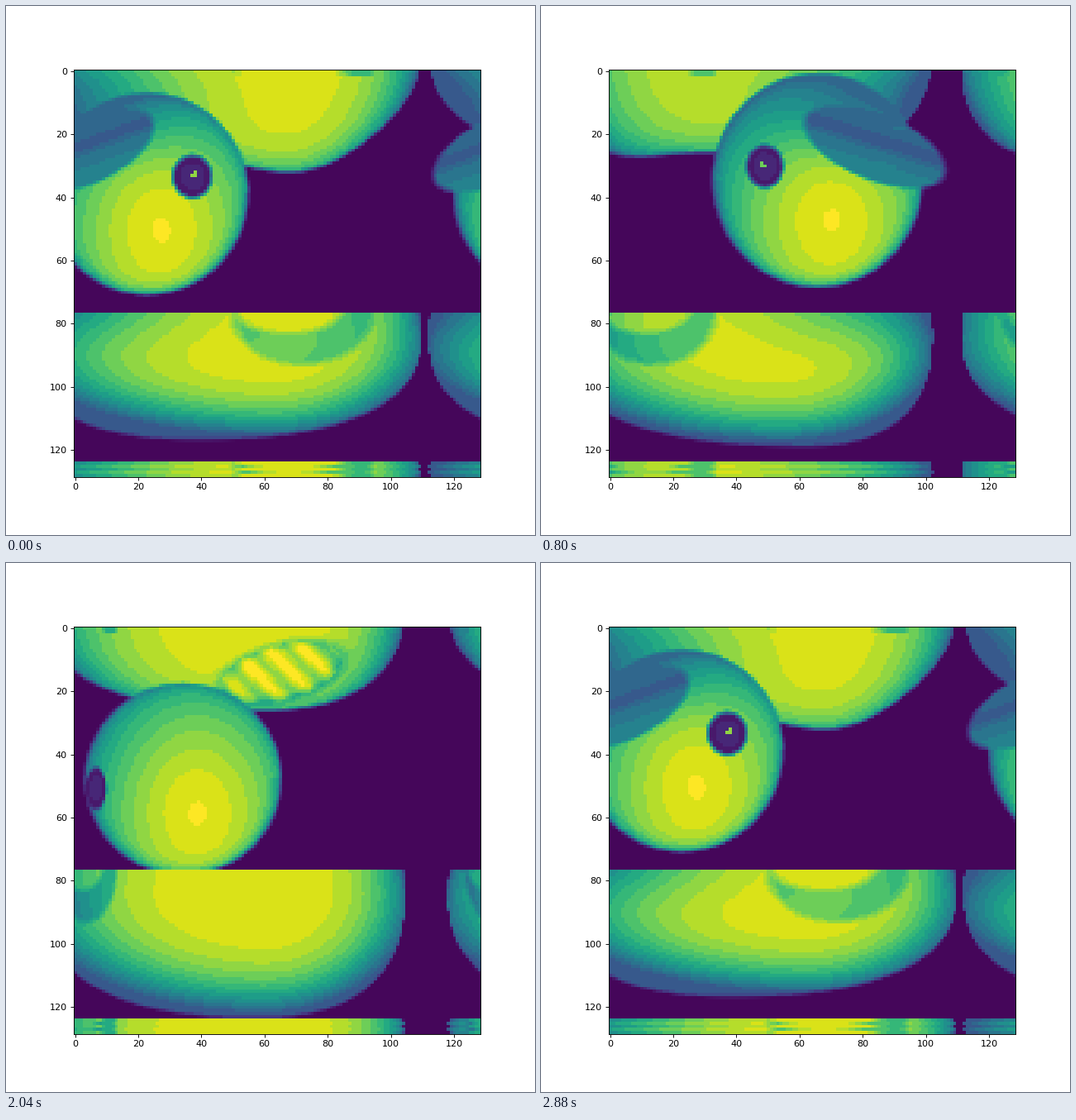
Write a matplotlib script that moves like this. It is 640 px wide and 640 px high and loops after 2.92 s.

```python
import numpy as np
import matplotlib.pyplot as plt
from matplotlib.animation import FuncAnimation

SIZE, STEPS, INTERVAL = 129, 73, 40
WAIST = 84

# The picture is rolled sideways, its upper part is flipped,
# and a few waist rows repeat at the bottom.
cols = np.arange(SIZE)
cols = np.where(cols < 110, cols, cols - SIZE)
rows = np.r_[76 - np.arange(77), np.arange(77, 124), [76, 81, 76, 82, 77]]
X, Y = np.meshgrid(cols.astype(float), rows.astype(float))
H = 76 - Y  # height above the fold


def ellipse(cx, ch, rx, ry, slope=0):
    return ((X - cx) / rx) ** 2 + ((H - ch - slope * (X - cx)) / ry) ** 2


def soft(e, radius):
    """Coverage of an ellipse with a blurred edge."""
    return np.clip((1 - e) * radius / 2.6 + 0.5, 0, 1)


def ramp(d):
    return np.clip(d / 1.5 + 0.5, 0, 1)


def over(img, value, alpha):
    return img * (1 - alpha) + value * alpha


def draw_wings(turn):
    """Darkness of the crescent under each visible wing."""
    dark = np.zeros_like(X)
    for side in (-1, 1):
        a = turn + side * np.pi / 2
        c = np.cos(a)
        if c > 0.1:
            wx, w = 46 + 45 * np.sin(a), 27 * c
            outer = soft(ellipse(wx, -1, w, 16), 8)
            inner = soft(ellipse(wx - 0.2 * w, 2, 0.8 * w, 9), 5)
            dark += 0.2 * outer * (1 - inner) * (Y > 74)
    return dark


def draw_tail(turn):
    """Outline and feather stripes of the tail, seen from behind."""
    s, back = np.sin(turn), max(0, -np.cos(turn))
    e = np.sqrt(ellipse(50 - 45 * s, 14, 19, 9, 0.6 * s))
    edge = 0.16 * back * np.exp(-((e - 1) / 0.15) ** 2)
    stripes = 0.16 * back ** 8 * np.cos(2 * np.pi * (X - H - 66) / 11.5)
    return stripes * (e < 1) - edge


def draw_body(img, turn, shade):
    s, c, c2, s2 = np.sin(turn), np.cos(turn), np.cos(2 * turn), np.sin(2 * turn)
    left = -15 - 4 * c
    right = min(109.5, 104.5 - 5.5 * s + 2 * c)
    low, mid = 50 + 12 * s2, 58 - 5 * s
    depth = 118.5 + 6 * c2 - WAIST

    u = np.abs(X - low) / np.where(X < low, low - left, right - low)
    dome = (1 - np.clip(u, 0, 1) ** 2.4) ** (1 / 2.4)
    rump = 14 * max(0, c) * np.exp(-((X - 45 + 50 * s + 22 * c) / 25) ** 2)
    top = 76 - WAIST + 34 * dome + rump
    alpha = ramp(top - H) * ramp(WAIST + depth * dome - Y) * (u <= 1)

    u = (X - mid) / np.where(X < mid, mid - left, right - mid)
    v = (Y - WAIST) / np.where(Y > WAIST, depth, 75)
    g = 0.96 - 0.56 * (u * u + 1.2 * v * v) ** 1.8
    g -= 0.25 * np.exp(-np.clip(top - H, 0, None) / 4)
    g += draw_tail(turn) - draw_wings(turn)
    return over(img, np.clip(g - shade, 0.3, 1), alpha)


def head_shape(turn):
    s, c, c2 = np.sin(turn), np.cos(turn), np.cos(2 * turn)
    return (44 + 27 * s + 3.5 * (c + c2), 40.5 - 6 * c - 2.5 * s + c2,
            31.5 + 2.5 * (c + c2), 31 + 4 * (c + c2))


def draw_head(img, head, shade):
    cx, ch, rx, ry = head
    e = ellipse(*head)
    d = np.hypot((X - cx - 4.5) / rx, 0.75 * (H - ch - 0.36 * ry) / ry)
    rim = np.where(H > ch, 0.35, 0.2) * np.clip(e, 0, 1) ** 9
    g = 0.98 - 0.35 * d ** 1.6 - rim - shade
    return over(img, np.clip(g, 0.32, 1), soft(e, min(rx, ry)))


def draw_beak(img, turn, head):
    s, c = np.sin(turn), np.cos(turn)
    front = max(0, c)
    cx = head[0] + s * (31 - 12 * c) + 3 * front
    ch = head[1] - 5 - 11 * c + 3 * s
    rx, ry, slope = 11 + 16 * front, 11, 0.45 * s
    t = (H - ch - slope * (X - cx)) / ry
    g = 0.39 + 0.06 * t - (0.04 + 0.1 * front) * np.exp(-((t + 0.2) / 0.27) ** 2)
    for dx, dh in ((8, -6), (4, 6)):
        g += 0.5 * front ** 8 * np.exp(-ellipse(cx + dx, ch + dh, 2.4, 0.7))
    return over(img, g, soft(ellipse(cx, ch, rx, ry, slope), ry))


def draw_eyes(img, turn, head):
    for side in (-1, 1):
        a = turn + side * np.radians(80)
        s, c = np.sin(a), np.cos(a)
        if c > 0.15:
            ex = head[0] + 0.95 * head[2] * s + 1.5
            eh = head[1] + 5 - 11.5 * c
            e = ellipse(ex, eh, 2.5 + 4 * c, 6.7)
            img = over(img, 0.07 + 0.05 * (e < 0.4), soft(e, 5))
            if c > 0.4:
                glint = ellipse(ex + 1.6 * s, eh - 0.5, 1.1, 1.1) < 1
                img = np.where(glint, 0.25 + 0.65 * c, img)
    return img


def render(k):
    turn = np.radians(5 * k % 360 - 55)
    s, c = np.sin(turn), np.cos(turn)
    head = head_shape(turn)
    chin = 0.42 * np.clip(0.3 + 0.7 * c, 0, 1)
    shade = chin * np.exp(-ellipse(head[0] + 25 * s, 8, 25, 12) / 2)

    img = draw_body(np.full(X.shape, 0.018), turn, shade)
    if c > 0.3:
        img = draw_beak(draw_head(img, head, shade), turn, head)
    else:
        img = draw_head(draw_beak(img, turn, head), head, shade)
    img = draw_eyes(img, turn, head)
    return np.where(img > 0.1, np.round(img * 18) / 18, img)


fig, ax = plt.subplots(figsize=(8, 8), dpi=80)
picture = ax.imshow(render(0), cmap="viridis", vmin=0, vmax=1, interpolation="nearest")


def update(k):
    picture.set_data(render(k))
    return [picture]


anim = FuncAnimation(fig, update, frames=STEPS, interval=INTERVAL,
                     repeat=True, repeat_delay=0)
plt.show()
```
